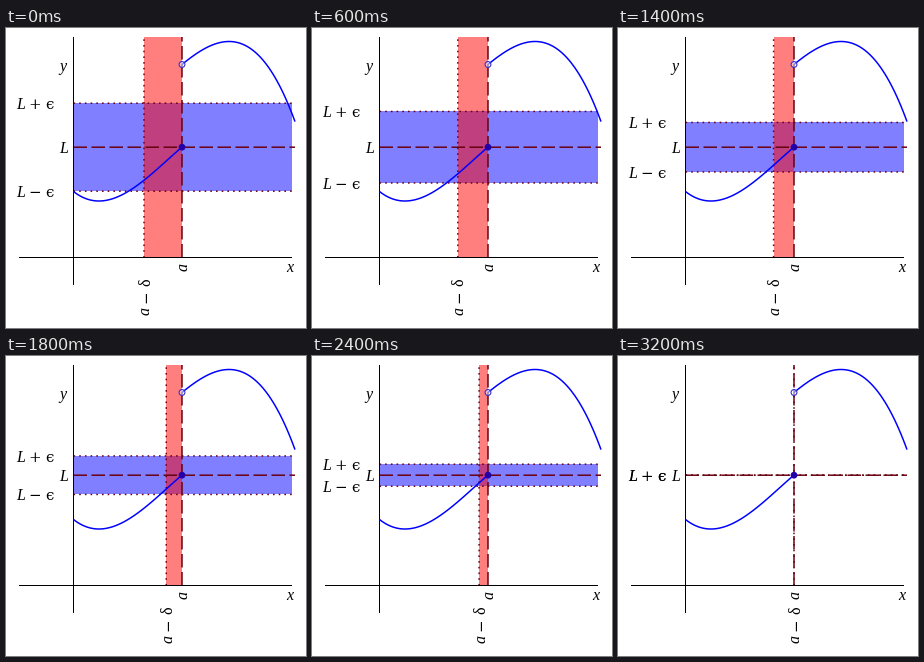
Animation, 300 px wide and 300 px high, one loop 3.4 s. Source, as a matplotlib script:

```python
import numpy as np
import matplotlib.pyplot as plt
from matplotlib.animation import FuncAnimation
from matplotlib.patches import Circle, Rectangle

SIZE, DPI = 300, 100
FRAMES, INTERVAL = 17, 200
PX = 72 / DPI
LEFT, RIGHT, TOP, BASE = 67.5, 286, 9, 229.5
A, L = 176, 119.2
MAROON = "#680010"
DASH = (13.5, 4.5)
DOT = (1.6, 4.1)

plt.rcParams["lines.scale_dashes"] = False
fig = plt.figure(figsize=(SIZE / DPI, SIZE / DPI), dpi=DPI, facecolor="white")
ax = fig.add_axes([0, 0, 1, 1])
ax.set(xlim=(0, SIZE), ylim=(SIZE, 0))
ax.axis("off")


def line(xs, ys, color, width=1.0, dash=None, z=3):
    style = (0, tuple(d * PX for d in dash)) if dash else "-"
    return ax.plot(xs, ys, color=color, lw=width * PX, ls=style, snap=False,
                   solid_capstyle="butt", dash_capstyle="butt", zorder=z)[0]


def label(x, y, text, italic=True, size=16, font="Liberation Serif", rotation=0):
    return ax.text(x, y, text, family=font, size=size * PX,
                   style="italic" if italic else "normal", rotation=rotation,
                   rotation_mode="anchor", ha="left", va="baseline", zorder=6)


def symbol(x, y, text, size=15, rotation=0):
    return label(x, y, text, False, size, "DejaVu Serif", rotation)


def epsilon_label(sign):
    return [label(10, 0, "L"), symbol(22.5, 0, sign), symbol(39.5, 0, "ϵ")]


# Tolerance bands and their dotted edges
blue_band = ax.add_patch(Rectangle((LEFT, L), RIGHT - LEFT, 0, fc="blue",
                                   alpha=0.5, lw=0, zorder=1))
red_band = ax.add_patch(Rectangle((A, TOP), 0, BASE - TOP, fc="red",
                                  alpha=0.5, lw=0, zorder=2))
upper = line([LEFT, RIGHT], [L, L], MAROON, 1.5, DOT)
lower = line([LEFT, RIGHT], [L, L], MAROON, 1.5, DOT)
edge = line([A, A], [BASE, TOP], MAROON, 1.5, DOT)

# Limit lines and axes
line([LEFT, 289], [L, L], MAROON, 1.5, DASH)
line([A, A], [BASE, TOP], MAROON, 1.5, DASH)
line([LEFT, LEFT], [TOP, 257], "black", z=4)
line([13, RIGHT], [BASE, BASE], "black", z=4)

# Two cubic branches with a jump at a
t = np.linspace(0, A - LEFT, 120)
line(LEFT + t, 163.5 + t * (t - 54.5) * (6.33e-5 * t - 0.01446), "blue", 1.5, z=5)
s = np.linspace(A - 223, 66, 120)
line(223 + s, 13.5 + 0.01373 * s**2 + 7.06e-5 * s**3, "blue", 1.5, z=5)
ax.add_patch(Circle((A, L), 3.4, fc="#2400a8", lw=0, zorder=6))
ax.add_patch(Circle((A, 36.5), 2.9, fc=(1, 1, 1, 0.5), ec="#3030d0",
                    lw=1.1 * PX, zorder=6))

label(53, 43, "y")
label(280, 244.5, "x")
label(53, 125, "L")
label(A + 6, 243, "a", rotation=90)
plus_label = epsilon_label("+")
minus_label = epsilon_label("−")
delta_label = [label(0, 287, "a", rotation=90),
               symbol(0, 275, "−", rotation=90),
               label(0, 258, "δ", italic=False, rotation=90)]


def update(frame):
    u = 1 - frame / (FRAMES - 1)
    eps = 44 * u
    delta = 35.5 * u + 2.5 * u**3
    blue_band.set_y(L - eps)
    blue_band.set_height(2 * eps)
    red_band.set_x(A - delta)
    red_band.set_width(delta)
    upper.set_ydata([L - eps] * 2)
    lower.set_ydata([L + eps] * 2)
    edge.set_xdata([A - delta] * 2)
    for part in plus_label:
        part.set_y(L - eps + 6)
    for part in minus_label:
        part.set_y(L + eps + 6)
    for part in delta_label:
        part.set_x(A - delta + 6)
    return []


anim = FuncAnimation(fig, update, frames=FRAMES, interval=INTERVAL,
                     repeat=True, repeat_delay=0)
plt.show()
```
